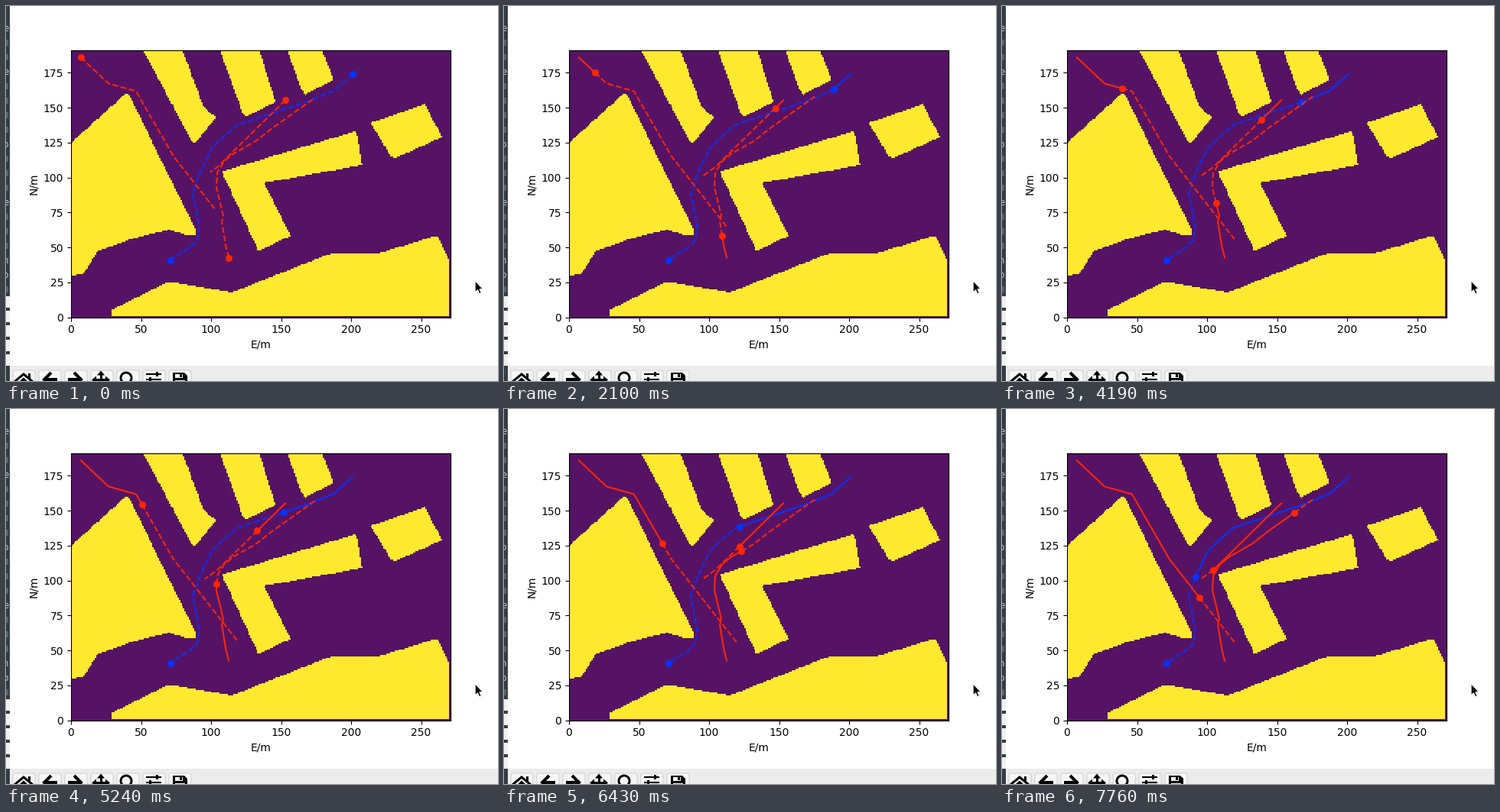
These frames come from a looping animation (643 by 491 pixels, 8 s). A matplotlib script:

```python
import random

import numpy as np
import matplotlib.pyplot as plt
from matplotlib.animation import FuncAnimation
from matplotlib.colors import ListedColormap
from matplotlib.patches import Circle, FancyBboxPatch, Polygon, Rectangle
from matplotlib.path import Path

W, H = 643, 491
LEFT, BOTTOM = 85, 407.7
COLS, ROWS = 271, 191              # map size in metres, one cell per metre
SCALE = 496 / COLS
PURPLE, YELLOW = "#561366", "#fee92f"
RED, BLUE = "#ff2600", "#0433ff"
INTERVAL, LOOP = 40, 8000

# Waiting time before each step, counted in ticks; planning gets faster
TICK = 149.3
WAITS = [9, 5, 6, 4, 4, 4, 3, 2, 2, 2, 2, 2, 1, 2, 1, 2, 1]
STEP_TIMES = np.cumsum(WAITS) * TICK
HORIZON = 18.6                     # steps planned ahead

# Building corners and vehicle routes, in metres
BUILDINGS = [
    [(-1, 124), (39, 160), (41, 160), (88.8, 63), (88.8, 58.6), (83, 59),
     (70, 62.8), (45, 56.8), (19, 47.5), (8.7, 31), (-1, 30)],
    [(51, 192), (79.3, 192), (94.5, 150.8), (103.3, 143), (89, 125),
     (86.3, 125.7)],
    [(106, 192), (134.2, 192), (146, 154), (125, 143.5), (123, 145)],
    [(154, 192), (179, 192), (187.5, 170), (167.2, 159.3), (164.5, 163)],
    [(214, 139), (252.5, 152.5), (265, 129), (231, 113.7), (228.4, 115.3)],
    [(107.7, 104.4), (202.5, 133), (204.4, 131), (207.7, 109),
     (137.7, 96.2), (156.6, 58.5), (133.9, 47.5)],
    [(29, 1), (29, 5.5), (68.3, 24.9), (75, 24.9), (114.8, 18), (185.8, 46),
     (219.7, 46), (258, 57.7), (262, 57.7), (270.1, 41), (270.1, 1)],
]
GOAL = (71, 41)
MAIN_ROUTE = [(201, 174), (187.4, 162), (166.7, 153.7), (119, 137.8),
              (108.7, 129), (100.5, 121), (91.8, 102.8), (87, 89),
              (91.5, 65), (90.2, 55.3), (85, 50), GOAL]
WEST_ROUTE = [(7, 186), (26.8, 167.3), (46.4, 161.8), (73.2, 115.2),
              (119.5, 56)]
NORTH_ROUTE = [(153, 155.3), (104.4, 107.5), (95.6, 101.2)]
SOUTH_ROUTE = [(112.6, 42.7), (110.4, 51.5), (107.7, 68.4), (108.7, 72.8),
               (103.8, 93), (104.4, 103.4), (109.3, 111.6), (115.8, 117),
               (132.2, 126.3), (143.2, 135), (175.5, 158)]

plt.rcParams["font.family"] = "DejaVu Sans"
fig = plt.figure(figsize=(W / 100, H / 100), dpi=100, facecolor="white")


def draw_map():
    ax = fig.add_axes([LEFT / W, 1 - BOTTOM / H,
                       COLS * SCALE / W, ROWS * SCALE / H])
    east, north = np.meshgrid(np.arange(COLS) + 0.5, np.arange(ROWS) + 0.5)
    cells = np.column_stack([east.ravel(), north.ravel()])
    filled = np.any([Path(b).contains_points(cells) for b in BUILDINGS], axis=0)
    ax.imshow(filled.reshape(ROWS, COLS), origin="lower", aspect="auto",
              extent=(0, COLS, 0, ROWS), interpolation="nearest",
              cmap=ListedColormap([PURPLE, YELLOW]), vmin=0, vmax=1)
    ax.set(xlabel="E/m", ylabel="N/m", xlim=(0, COLS), ylim=(0, ROWS),
           xticks=range(0, 251, 50), yticks=range(0, 176, 25))
    ax.set_autoscale_on(False)
    return ax


world = draw_map()
stage = fig.add_axes([0, 0, 1, 1], zorder=5)
stage.set(xlim=(0, W), ylim=(H, 0))
stage.axis("off")


def box(x, y, w, h, color="black"):
    stage.add_patch(Rectangle((x, y), w, h, fc=color, lw=0))


def poly(points, color="black", **kw):
    stage.add_patch(Polygon(points, fc=color, **{"lw": 0, **kw}))


def stroke(xs, ys, width):
    stage.plot(xs, ys, color="black", lw=width, solid_capstyle="butt",
               solid_joinstyle="miter")


def draw_toolbar():
    box(5, 471, W - 5, 20, "#ececec")
    for i in range(7):
        stage.add_patch(FancyBboxPatch(
            (9 + 34 * i, 477), 29, 30, boxstyle="round,pad=0,rounding_size=3",
            fc="#f6f6f6", ec="#cfcfcf", lw=0.7))
    # home
    stroke([11, 23, 35], [492, 482, 492], 2.2)
    poly([(16, 493), (23, 486.5), (30, 493)])
    box(29, 481, 3, 6)
    # back and forward
    for tip, d in ((48, 1), (100, -1)):
        stroke([tip + 11 * d, tip + 2 * d, tip + 11 * d], [480, 489, 498], 2.9)
        stroke([tip + 3 * d, tip + 19 * d], [489, 489], 2.9)
    # pan
    cx, cy = 124, 489.5
    box(cx - 1.5, 483, 3, 8)
    box(cx - 8, cy - 1.5, 16, 3)
    for dx, dy in ((0, -1), (-1, 0), (1, 0)):
        poly([(cx + 12 * dx, cy + 12 * dy),
              (cx + 6 * dx - 5 * dy, cy + 6 * dy + 5 * dx),
              (cx + 6 * dx + 5 * dy, cy + 6 * dy - 5 * dx)])
    # zoom
    stage.add_patch(Circle((157, 487), 7, fill=False, ec="black", lw=2.1))
    # sliders
    for y, knob in ((482, 197), (488.5, 188)):
        stroke([183, 203], [y, y], 1.5)
        box(knob - 1.5, y - 3, 3, 6)
    # save
    poly([(218, 480), (233, 480), (237, 484), (237, 495), (218, 495)])
    box(221, 482, 10, 5, "#f6f6f6")
    box(227, 482, 2.5, 4)
    box(221, 490, 13, 3, "#f6f6f6")


def draw_side_strip():
    rng = random.Random(4)
    box(0, 0, 5, H, "#343d45")
    for y in range(25, 375, 19):
        if rng.random() < 0.3:
            stage.text(-4, y + 8, rng.choice("enp"), color="#c3c8cc",
                       fontsize=8.5, clip_on=True)
        else:
            box(0, y, 3, 8, "#59636b")
    for y in range(380, 475, 19):
        box(0, y, 5, 15, "#f1f1f1")


def draw_cursor():
    poly([(613, 359.5), (613, 375), (616.4, 371.8), (618.6, 377),
          (621.2, 375.9), (619, 370.8), (623.4, 370.6)],
         ec="white", lw=0.9)


def dot_at(x, y, color):
    return world.plot([x], [y], "o", color=color, ms=6, mew=0.5)[0]


class Vehicle:
    """Drives along a route at constant speed, in metres per step."""

    def __init__(self, route, color, speed=8, horizon=HORIZON):
        self.points = np.array(route, float)
        legs = np.hypot(*np.diff(self.points, axis=0).T)
        self.dist = np.append(0, np.cumsum(legs))
        self.speed, self.horizon = speed, horizon
        self.trail, = world.plot([], [], "-", color=color, lw=1.5)
        self.plan, = world.plot([], [], "--", color=color, lw=1.5)
        self.dot = dot_at(*route[0], color)

    def section(self, start, end):
        """Part of the route between two travelled distances."""
        inner = self.dist[(self.dist > start) & (self.dist < end)]
        d = np.concatenate([[start], inner, [end]])
        return [np.interp(d, self.dist, axis) for axis in self.points.T]

    def show(self, step):
        here = step * self.speed
        goal = min(here + self.horizon * self.speed, self.dist[-1])
        ahead = self.section(here, goal)
        self.trail.set_data(*self.section(0, here))
        self.plan.set_data(*ahead)
        self.dot.set_data(ahead[0][:1], ahead[1][:1])
        return self.trail, self.plan, self.dot


draw_toolbar()
draw_side_strip()
draw_cursor()
dot_at(*GOAL, BLUE)
vehicles = [
    Vehicle(MAIN_ROUTE, BLUE, horizon=np.inf),
    Vehicle(WEST_ROUTE, RED),
    Vehicle(NORTH_ROUTE, RED, speed=4),
    Vehicle(SOUTH_ROUTE, RED),
]


def update(n):
    step = np.searchsorted(STEP_TIMES, (n + 1) * INTERVAL - 1, side="right")
    return [artist for v in vehicles for artist in v.show(step)]


anim = FuncAnimation(fig, update, frames=LOOP // INTERVAL, interval=INTERVAL,
                     repeat=True, repeat_delay=0, blit=False)
plt.show()
```
